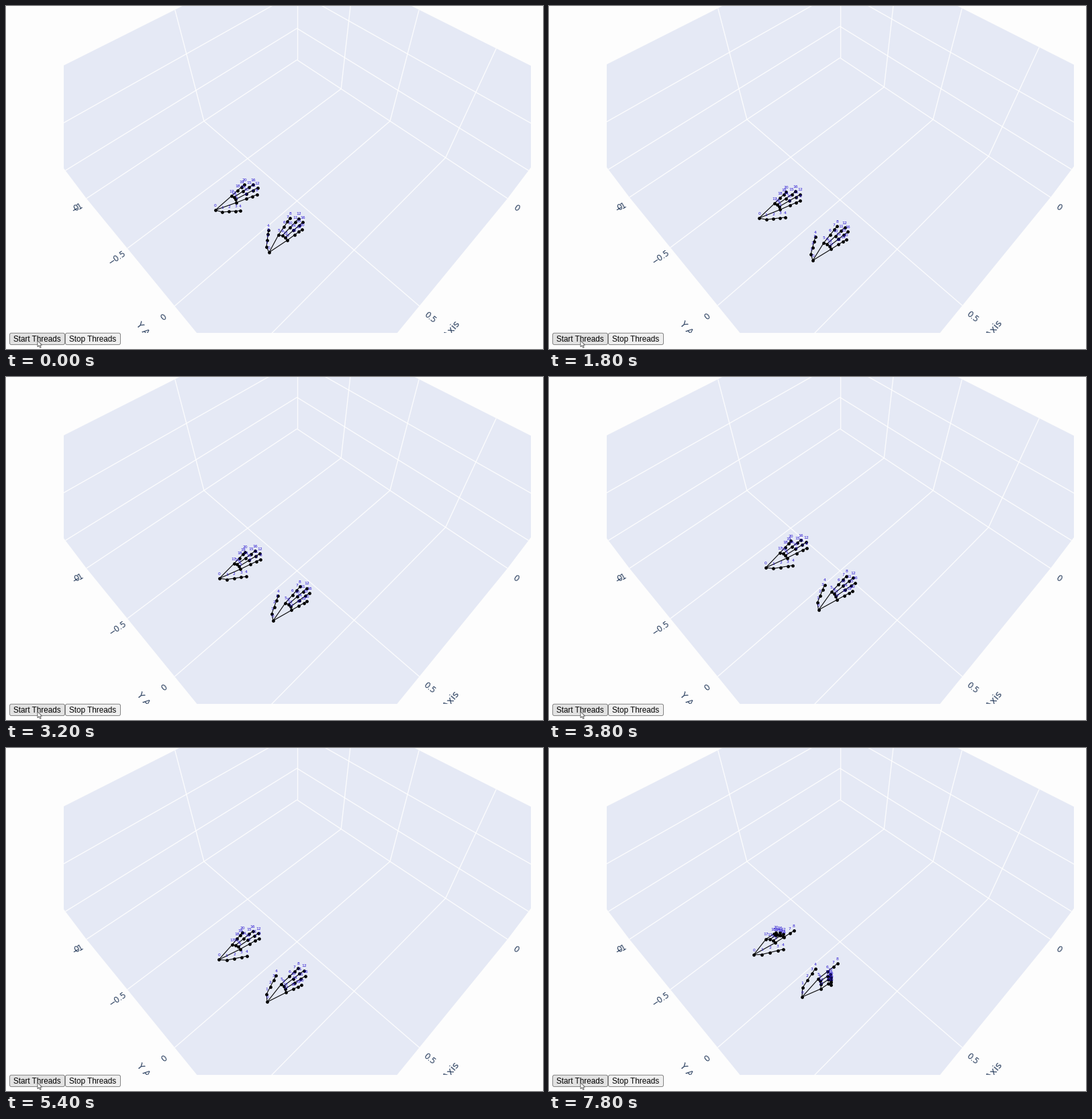
A matplotlib script that plays this animation: 800 by 511 pixels, repeating every 8 s.

```python
import numpy as np
import matplotlib.pyplot as plt
from matplotlib.animation import FuncAnimation
from matplotlib.collections import LineCollection
from matplotlib.patches import FancyBboxPatch, Polygon, Rectangle

W, H, DPI = 800, 511, 100
STEP, FRAMES = 200, 40
PX = 72 / DPI
PAPER, WALL, INK, BLUE = "#fdfdfd", "#e5e9f5", "#2a3f5f", "#2410d0"

plt.rcParams["font.family"] = "DejaVu Sans"
fig = plt.figure(figsize=(W / DPI, H / DPI), dpi=DPI, facecolor=PAPER)
ax = fig.add_axes([0, 0, 1, 1])
ax.set_xlim(0, W)
ax.set_ylim(H, 0)
ax.axis("off")


def smooth(t, start, end):
    u = np.clip((t - start) / (end - start), 0, 1)
    return u * u * (3 - 2 * u)


# --- 3D box -----------------------------------------------------------
# a runs along the right floor edge, b along the left one, h goes up.
TOP = 0.21
A_TICKS, B_TICKS, H_TICKS = (0.256, 0.507, 0.757), (0.507,), (0.07, 0.14)
OUTLINE = [(0, 0, TOP), (1, 0, TOP), (1, 0, 0), (1, 1, 0), (0, 1, 0), (0, 1, TOP)]
EDGES = [[(0, 0, 0), end] for end in [(1, 0, 0), (0, 1, 0), (0, 0, TOP)]]
EDGES += [[(a, 0, TOP), (a, 0, 0), (a, 1, 0)] for a in A_TICKS]
EDGES += [[(0, b, TOP), (0, b, 0), (1, b, 0)] for b in B_TICKS]
EDGES += [[(0, 1, h), (0, 0, h), (1, 0, h)] for h in H_TICKS]

view = Rectangle((85.5, -2), 696.5, 489, transform=ax.transData)
hull = ax.add_patch(Polygon([(0, 0), (1, 1), (1, 0)], fc=WALL, ec="none"))
grid = ax.add_collection(
    LineCollection([], colors="white", linewidths=1.4 * PX, alpha=0.85))
hull.set_clip_path(view)
grid.set_clip_path(view)


def project(points, settled):
    a, b, h = np.array(points, float).T
    depth = 1 - 0.23 * (a + b) - h
    x = 433.5 + 241.5 * (a - b) / depth
    y = 80.2 - 3 * settled + ((159 + settled) * (a + b) - 623 * h) / depth
    return np.column_stack([x, y])


def label(x, y, s, angle, size=12, ha="center"):
    return ax.text(x, y, s, rotation=angle, fontsize=size * PX, color=INK, ha=ha,
                   va="center", rotation_mode="anchor")


LABELS = [
    label(107, 300, "\u22121", 31),
    label(105, 301, "0", 31),
    label(166, 375.5, "\u22120.5", 34),
    label(235, 463.5, "0", 40),
    label(760.5, 301, "0", -34),
    label(632, 464, "0.5", -39),
    label(196, 472, "Y Axis", -50, 14, "left"),
    label(674, 471, "X Axis", 50, 14, "right"),
]
REST = [text.get_position() for text in LABELS]


def place_box(settled):
    hull.set_xy(project(OUTLINE, settled))
    grid.set_segments([project(edge, settled) for edge in EDGES])
    for text, (x, y) in zip(LABELS, REST):
        inward = 0.8 if x < W / 2 else -0.8
        text.set_position((x + inward * settled, y - settled))


# --- buttons and pointer ----------------------------------------------
ax.add_patch(Rectangle((0, 487), W, H - 487, fc=PAPER, ec="none", zorder=4))


def button(x, s, fill):
    ax.add_patch(FancyBboxPatch((x + 0.5, 487.3), 82, 17.2, fc=fill, ec="#858585",
                                boxstyle="round,pad=0,rounding_size=2.5",
                                lw=PX, zorder=5))
    ax.text(x + 41.5, 500.2, s, ha="center", va="baseline", color="black",
            family="Liberation Sans", fontsize=11.7 * PX, zorder=6)


button(5, "Start Threads", "#e2e2e2")
button(88, "Stop Threads", "#efefef")
ARROW = [(0, 0), (0, 9.2), (2.1, 7.3), (3.7, 10.6), (5.2, 9.9), (3.7, 6.8), (6.6, 6.6)]
ax.add_patch(Polygon(np.array(ARROW) + (47, 498.5), fc="white", ec="#555555",
                     lw=0.9 * PX, zorder=7))

# --- hands ------------------------------------------------------------
# Opening and closing shapes, measured from the wrist:
# base and tip of the thumb, of the index finger and of the little finger.
LEFT = np.array([
    [(10, 3), (37, 1), (31, -11), (62, -23), (24, -21), (43, -38)],
    [(12, 0), (43, -7), (32, -17), (60, -34), (19, -23), (33, -41)],
], float)
RIGHT = np.array([
    [(-4, -8), (-1, -33), (14, -26), (31, -51), (27, -18), (49, -34)],
    [(0, -13), (17, -41), (23, -27), (50, -50), (28, -13), (52, -23)],
], float)
BASE_ARCH, TIP_ARCH = np.array([1.2, -1.4]), np.array([7, -5])
CURL = np.array([15, -10])
THUMB = np.array([0, 0.38, 0.74, 1])
OPEN = np.array([0, 0.48, 0.79, 1])
FOLDED = np.array([0, 0.75, 1, 1])
BONES = [(0, 1), (0, 5), (0, 17), (5, 9), (9, 13), (13, 17)]
BONES += [(k + j, k + j + 1) for k in range(1, 21, 4) for j in range(3)]

# turning points of the left wrist: time, x, y
TURNS = [(0, 312, 304), (1800, 313, 316), (3200, 318, 300), (3750, 323, 284),
         (6200, 315, 326), (6800, 312, 306), (7800, 305, 308)]


def left_wrist(t):
    for (t0, *p), (t1, *q) in zip(TURNS, TURNS[1:]):
        if t <= t1:
            return np.array(p) + np.subtract(q, p) * smooth(t, t0, t1)


def right_wrist(t):
    return left_wrist(t) + (80 - 8 * smooth(t, 3200, 5400), 63)


def joints(shapes, t):
    shape = shapes[0] + (shapes[1] - shapes[0]) * t / 6800
    fold = smooth(t, 6800, 7800)
    thumb, thumb_tip, index, index_tip, little, little_tip = shape
    pts = [(0, 0), *(thumb + f * (thumb_tip - thumb) for f in THUMB)]
    for n in range(4):
        u = n / 3
        arch = 4.5 * u * (1 - u)
        curl = fold if n else 0
        base = index + (little - index) * u + BASE_ARCH * arch
        tip = index_tip + (little_tip - index_tip) * u + TIP_ARCH * arch
        reach = (tip - base) * (1 - curl) + CURL * curl
        frac = OPEN + (FOLDED - OPEN) * curl
        finger = base + frac[:, None] * reach
        finger[2, 1] += 4 * curl
        pts.extend(finger)
    return np.array(pts)


class Hand:
    def __init__(self, shapes, wrist):
        self.shapes, self.wrist = shapes, wrist
        self.bones = ax.add_collection(
            LineCollection([], colors="black", linewidths=1.1 * PX, zorder=2))
        self.dots, = ax.plot([], [], "o", color="black", ms=4.8 * PX, mew=0, zorder=2.5)
        self.tags = [ax.text(0, 0, str(n), color=BLUE, fontsize=6 * PX, ha="center",
                             va="center", zorder=3) for n in range(21)]

    def pose(self, t):
        p = joints(self.shapes, t) + self.wrist(t)
        self.bones.set_segments([p[[a, b]] for a, b in BONES])
        self.dots.set_data(p[:, 0], p[:, 1])
        for tag, (x, y) in zip(self.tags, p):
            tag.set_position((x, y - 6.8))


hands = [Hand(LEFT, left_wrist), Hand(RIGHT, right_wrist)]


def draw(i):
    place_box(float(i >= 3))
    for hand in hands:
        hand.pose(i * STEP)
    return []


anim = FuncAnimation(fig, draw, frames=FRAMES, interval=STEP, repeat=True,
                     repeat_delay=0, blit=False)
plt.show()
```
